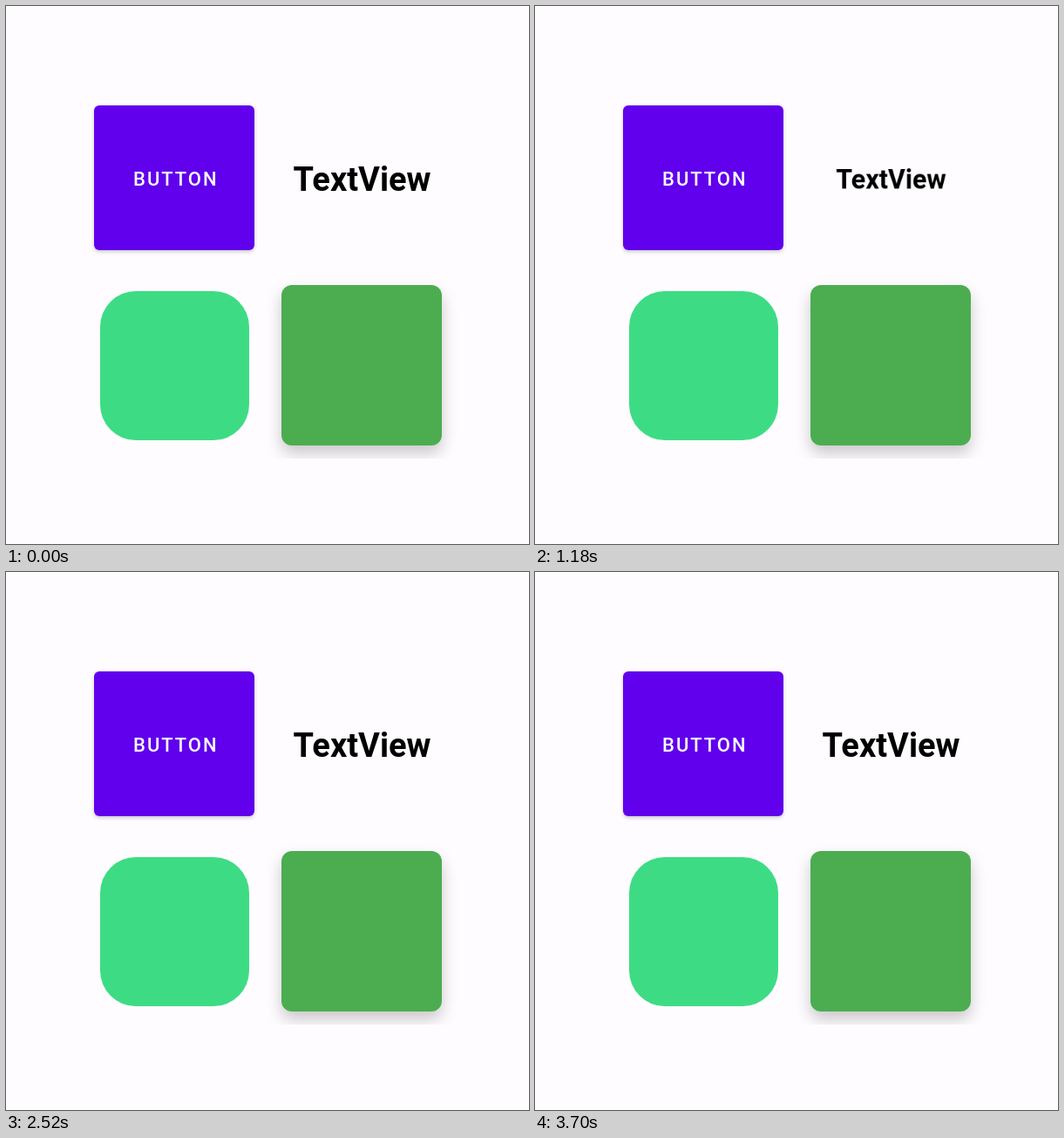
Write an HTML page that moves like this. It is 600 by 617 pixels and loops after 3730 ms.

```html
<!DOCTYPE html>
<html lang="en">
<head>
<meta charset="utf-8">
<title>Push animations</title>
<style>
  html, body { margin: 0; width: 100%; height: 100%; overflow: hidden; background: #fefcff; }
  body { position: relative; font-family: Roboto, sans-serif; }
  div { position: absolute; box-sizing: border-box; }
  .label { text-align: center; white-space: nowrap; }
  #button { left: 101px; top: 114px; width: 184px; height: 166px; }
  #button div { inset: 0; border-radius: 6px; }
  #button .low { box-shadow: 0 2px 4px rgba(0, 0, 0, .2); }
  #button .high { box-shadow: 0 9px 16px rgba(0, 0, 0, .2); opacity: 0; }
  #button .face { background: #6000ec; overflow: hidden; }
  #button .ripple {
    inset: -42px -33px; border-radius: 50%; opacity: 0;
    background: radial-gradient(circle closest-side, rgba(255, 255, 255, .21) 62%, rgba(255, 255, 255, .13) 100%);
  }
  #button .label {
    inset: 1.5px -.8px -1.5px .8px; line-height: 166px; color: #fff;
    font-size: 22px; font-weight: 500; letter-spacing: .0893em; text-indent: .0893em;
  }
  #text {
    left: 316px; top: 169px; width: 185px; height: 60px; line-height: 60px;
    font-size: 38px; font-weight: 700; color: #000;
  }
  #icon { left: 108px; top: 326.5px; width: 171px; height: 171px; border-radius: 41px; background: #3ddc84; }
  #clip { left: 290px; top: 290px; width: 240px; height: 229px; overflow: hidden; }
  #card {
    left: 26px; top: 30px; width: 184px; height: 184px; border-radius: 12px;
    background: #4bad50; box-shadow: 0 9px 18px rgba(0, 0, 0, .21);
  }
</style>
</head>
<body>
<div id="button">
  <div class="low"></div>
  <div class="high"></div>
  <div class="face"><div class="ripple"></div></div>
  <div class="label">BUTTON</div>
</div>
<div id="text" class="label">TextView</div>
<div id="icon"></div>
<div id="clip"><div id="card"></div></div>
<script>
  const LOOP = 3730, PUSH = 300;
  const SINE = 'cubic-bezier(.37, 0, .63, 1)';

  // steps: [time in ms, value]
  function track(selector, prop, steps, easing = SINE) {
    const all = [[0, steps[0][1]], ...steps, [LOOP, steps[steps.length - 1][1]]];
    const frames = all.map(([time, value]) => ({ offset: time / LOOP, [prop]: value, easing }));
    document.querySelector(selector).animate(frames, { duration: LOOP, iterations: Infinity });
  }

  // selector, press time, release time, smallest scale
  const pushes = [
    ['#button', 180, 560, .9],
    ['#text', 890, 1260, .8],
    ['#icon', 1761, 2137, .6],
    ['#card', 2680, 3140, .75]
  ];

  for (const [selector, down, up, small] of pushes) {
    track(selector, 'transform', [
      [down, 'scale(1)'], [down + PUSH, `scale(${small})`],
      [up, `scale(${small})`], [up + PUSH, 'scale(1)']
    ]);
  }

  const [, down, up] = pushes[0];
  track('.high', 'opacity', [[down, 0], [down + 100, 1], [up, 1], [up + 100, 0]]);
  track('.ripple', 'opacity', [[down, 0], [down + 75, 1], [up, 1], [up + 150, 0]], 'linear');
  track('.ripple', 'transform', [
    [down, 'scale(.3)'], [down + 225, 'scale(1.12)'], [up + 150, 'scale(1.12)']
  ], 'cubic-bezier(.4, 0, .2, 1)');
</script>
</body>
</html>
```
